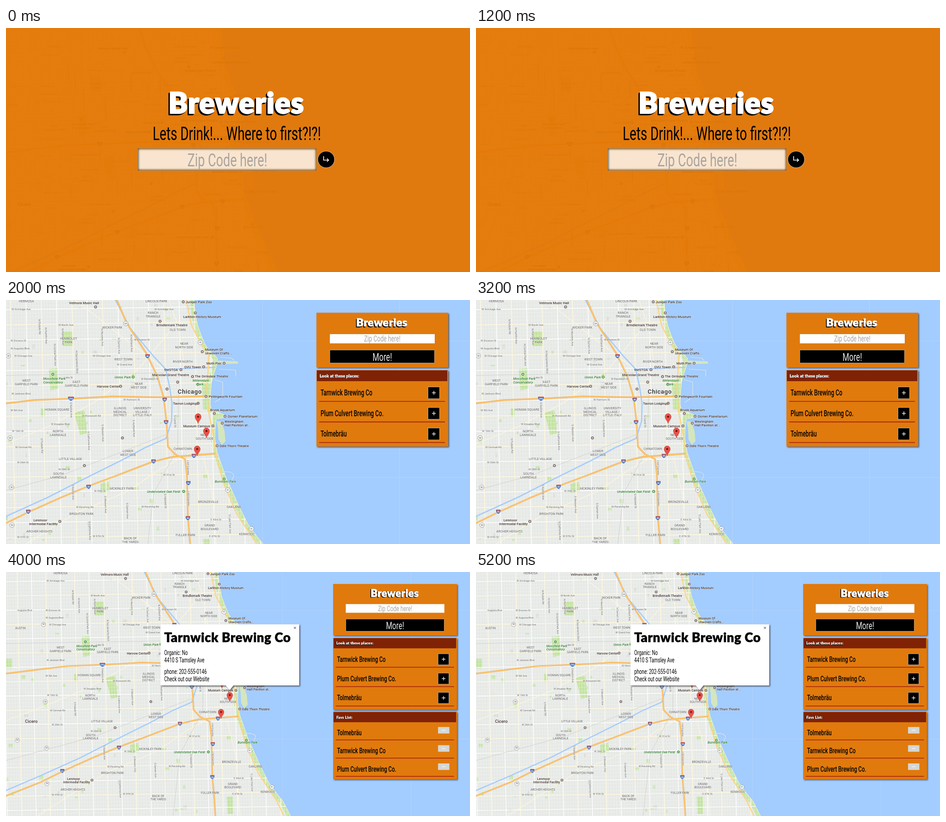
An HTML page that plays this animation: 1000 by 529 pixels, repeating every 6000 ms.

```html
<!DOCTYPE html>
<html lang="en">
<head>
<meta charset="utf-8">
<title>Breweries</title>
<style>
html, body { margin: 0; width: 100%; height: 100%; overflow: hidden; background: #a3ccff; }
svg { display: block; width: 100vw; height: 100vh; }
text { font-family: Roboto, sans-serif; white-space: pre; }
.head { font-family: Lato, sans-serif; font-weight: 900; letter-spacing: .02em; stroke-linejoin: round; }
.map text { font-size: 7.4px; paint-order: stroke; stroke: #fff; stroke-opacity: .55; stroke-width: 1.2px; stroke-linejoin: round; }
.map .area { font-size: 6.9px; fill: #5c5c5c; text-anchor: middle; }
.map .street { font-size: 5.8px; fill: #606060; }
.map .poi { fill: #40322f; font-weight: 500; }
.map .park { fill: #2f7d2f; font-weight: 500; }
.map .city { font-size: 13px; fill: #2b2b2b; text-anchor: middle; letter-spacing: .6px; font-weight: 500; }
.map .shield { font-size: 5px; fill: #fff; stroke: none; text-anchor: middle; font-weight: 700; }
.map .route { font-size: 5px; fill: #444; stroke: none; text-anchor: middle; }
</style>
</head>
<body>
<svg id="stage" viewBox="0 0 1000 529" preserveAspectRatio="none"></svg>
<script>
const ORANGE = '#e07a10', RED = '#7f2205';
const PLACES = ['Tarnwick Brewing Co', 'Plum Culvert Brewing Co.', 'Tolmebräu'];

let seed = 11;
const rnd = () => (seed = (seed * 16807) % 2147483647) / 2147483647;

const rect = (x, y, w, h, fill, more = '') =>
  `<rect x="${x}" y="${y}" width="${w}" height="${h}" fill="${fill}" ${more}/>`;
const line = (d, stroke, w, more = '') =>
  `<path d="${d}" fill="none" stroke="${stroke}" stroke-width="${w}" ${more}/>`;
const label = (x, y, s, cls, more = '') => `<text x="${x}" y="${y}" class="${cls}" ${more}>${s}</text>`;

// Narrow face: one fixed proportion for all interface text
const slim = (x, y, size, s, fill = '#000', anchor = 'start', weight = 400) =>
  `<text transform="translate(${x} ${y}) scale(.68 1)" font-size="${size}" fill="${fill}" text-anchor="${anchor}" font-weight="${weight}">${s}</text>`;

function head(x, y, size, s, anchor, drop) {
  const one = (dx, dy, c) => label(x + dx, y + dy, s, 'head',
    `font-size="${size}" fill="${c}" stroke="${c}" stroke-width="${size * .04}" text-anchor="${anchor}"`);
  return one(-drop, drop, '#000') + one(-drop / 2, drop / 2, '#000') + one(0, 0, '#fff');
}

// ---------- map ----------
const COAST = 'M397-60L405 0 408 30 413 55 420 75 427 92 436 108 449 119 456 127 453 144 447 163 443 178 441 200 440 226 442 236 452 241 466 247 473 251 466 256 453 258 451 275 450 300 455 330 462 350 469 370 475 388 482 402 490 420 501 445 511 465 521 485 532 501 546 519 555 530 580 580';
const LAND = COAST + 'H-100V-60z';

const ROADS = {
  river: 'M222-60L236 0 268 62 318 122 344 150 352 185 358 225 357 262 345 300 300 320 256 344 162 391 90 428 0 469-100 512M344 150L400 148 452 146',
  diagonal: 'M95-60L150 0 250 80 345 152M360 60L285 150 190 222 90 275 0 312-100 350M400 330L330 368 262 415 150 462 70 512-20 570M425 340L445 420 456 570M330-60L372 60 385 150',
  highway: 'M216-60L239 0 260 50 302 115 326 165 340 212 346 265 349 318 364 334 386 345 390 380 392 470 397 530 400 580M-100 237L0 224 60 217 140 214 230 209 330 211 430 209M-100 524L0 484 48 460 119 428 179 403 240 380 318 350 360 340 452 333',
  shore: 'M375-60L388 0 400 55 418 90 437 118 436 145 433 190 436 238 446 290 453 338 468 395 498 465 538 525 560 570'
};

function grid(from, to, step, along) {
  let d = '';
  for (let v = from; v < to; v += step)
    d += along ? `M-100 ${v + 1.5}L600 ${v - 9}` : `M${v - 1.2} -60L${v + 11.6} 580`;
  return d;
}

function streets() {
  const mile = 66;
  return line(grid(-78, 600, mile / 8, true) + grid(-122, 600, mile / 16 * 1.5, false), '#f6f7f5', .7, 'opacity=".65"')
    + line(grid(-78, 600, mile / 2, true) + grid(-122, 600, mile / 2, false), '#fff', 1.5)
    + line(grid(-78, 600, mile, true) + grid(-122, 600, mile, false), '#fcf5da', 1.6);
}

function blocks() {
  let s = '';
  for (let i = 0; i < 85; i++) {
    const x = rnd() * 520 - 90, y = rnd() * 620 - 50;
    s += rect(x.toFixed(1), y.toFixed(1), (3 + rnd() * 7).toFixed(1), (3 + rnd() * 7).toFixed(1),
      rnd() < .45 ? '#c8e5a9' : rnd() < .6 ? '#dcddd9' : '#ebe5d9');
  }
  const park = 'M122 68h22v32h-22zM92 150l20-2 2 44-18 4zM147 243l22-4 6 50-15 4zM204 398l18-4 2 21-20 3zM422 172h20l-2 66h-15zM-85 200h18v22h-18zM425 518h14v40h-12zM75 235h8v18h-8zM270 160h9v9h-9z';
  return s + `<path d="${park}" fill="#c3e3a0"/>`;
}

const AREAS = [
  [44, 5, 'HERMOSA'], [324, 5, 'LINCOLN PARK'], [317, 30, 'RANCH|TRIANGLE'], [229, 62, 'WICKER PARK'],
  [370, 67, 'OLD TOWN'], [135, 86, 'HUMBOLDT|PARK'], [384, 97, 'NEAR|NORTH SIDE'], [253, 131, 'WEST TOWN'],
  [381, 136, 'RIVER NORTH'], [286, 184, 'NEAR|WEST SIDE'], [44, 177, 'WEST|GARFIELD PARK'],
  [152, 180, 'EAST|GARFIELD PARK'], [110, 240, 'HOMAN SQUARE'], [246, 237, 'ILLINOIS|MEDICAL|DISTRICT'],
  [294, 237, 'UNIVERSITY|VILLAGE /|LITTLE ITALY'], [112, 287, 'NORTH|LAWNDALE'], [263, 330, 'LOWER|WEST SIDE'],
  [139, 347, 'LITTLE VILLAGE'], [113, 379, 'SOUTH|LAWNDALE'], [381, 325, 'CHINATOWN'], [428, 295, 'NEAR|SOUTH SIDE'],
  [250, 411, 'MCKINLEY PARK'], [436, 440, 'BRONZEVILLE'], [491, 451, 'OAKLAND'], [163, 466, 'BRIGHTON PARK'],
  [439, 491, 'GRAND|BOULEVARD'], [72, 504, 'ARCHER HEIGHTS'], [268, 519, 'BACK OF|THE YARDS'], [387, 512, 'FULLER PARK'],
  [519, 510, 'KENWOOD'], [-48, 132, 'AUSTIN']
];

// icon x, icon y, text x, text y, name
const POIS = [
  [193, 15, 136, 9, 'Velmora Music Hall'], [382, 4, 387, 7, 'Juniper Park Zoo'],
  [408, 28, 382, 39, 'Larkton History Museum'], [332, 46, 324, 57, 'Brindlemark Theatre'],
  [423, 112, 429, 110, 'Museum Of|Unwoven Crafts...'], [470, 137, 432, 140, 'Moth Pier'],
  [426, 145, 384, 148, 'QVU Tower'], [377, 151, 341, 154, 'theSTOA'], [370, 178, 315, 165, 'Marvolan Grand Theatre'],
  [402, 166, 407, 168, 'The Orrindale Theatre'], [247, 187, 196, 190, 'Harvow Center'],
  [431, 209, 437, 212, 'Pellingworth Fountain'], [414, 224, 360, 227, 'Tavron Lodgings'],
  [449, 246, 440, 241, 'Brusk Aquarium'], [472, 252, 478, 255, 'Osmer Planetarium'],
  [446, 273, 382, 276, 'Museum Campus'], [466, 267, 471, 266, 'Wexlingham|Hall Pavilion at...'],
  [455, 316, 460, 319, 'Odle Thorn Theatre'], [116, 480, 50, 480, '     Lenmoor|Intermodal Facility'],
  [169, 359, 0, 0, ''], [251, 299, 0, 0, ''], [347, 193, 0, 0, '']
];

const GREENS = [
  [383, 415, 304, 418, 'Understated Oak Field'], [101, 161, 80, 173, 'Mossfield Park|Conservatory'],
  [274, 167, 234, 170, 'Union Park'], [413, 183, 402, 177, 'Millennium|     Park'], [470, 388, 450, 396, 'Burnham Park']
];

const STREETS = [
  [12, 22, 'W Armitage Ave'], [320, 22, 'W Armitage Ave'], [113, 56, 'W North Ave'], [10, 90, 'W Division St'],
  [276, 88, 'W Division St'], [10, 107, 'W Augusta Blvd'], [18, 123, 'W Chicago Ave'], [187, 123, 'W Chicago Ave'],
  [239, 142, 'W Grand Ave'], [125, 170, 'Lake St'], [291, 173, 'W Randolph St'], [12, 205, 'W Jackson Blvd'],
  [253, 218, 'W Harrison St'], [10, 241, 'W 5th Ave'], [164, 253, 'W Roosevelt Rd'], [97, 271, 'W Douglas Blvd'],
  [13, 286, 'W 16th St'], [20, 321, 'W Cermak Rd'], [24, 354, 'W 26th St'], [113, 369, 'W 28th St'],
  [339, 381, 'W 31st St'], [190, 416, 'W 35th St'], [151, 451, 'W Pershing Rd'], [292, 450, 'W Pershing Rd'],
  [441, 478, 'E 43rd St'], [24, 516, 'W 47th St'], [187, 514, 'W 47th St'], [438, 514, 'E 47th St'], [-55, 90, 'Augusta Blvd']
];

const AVENUES = [
  [70, 42, 'N Pulaski Rd'], [84, 60, 'N Hamlin Ave'], [103, 95, 'N Central Park Ave'], [120, 62, 'N Homan Ave'],
  [150, 110, 'N Sacramento Blvd'], [205, 62, 'N Western Ave'], [241, 82, 'N Damen Ave'], [268, 75, 'N Ashland Ave'],
  [138, 222, 'S Kedzie Ave'], [176, 285, 'S California Ave'], [75, 300, 'S Pulaski Rd'], [206, 270, 'S Western Ave'],
  [273, 260, 'S Ashland Ave'], [362, 250, 'S Canal St'], [142, 400, 'S Kedzie Ave'], [212, 425, 'S Western Ave'],
  [259, 440, 'S Damen Ave'], [341, 420, 'S Halsted St'], [390, 348, 'I-94 Express'], [391, 415, 'I-90 Express'],
  [178, 480, 'S California Ave'], [480, 465, 'S Lake Park Ave']
];

const lines = (x, y, s, cls, more) => s.split('|').map((t, i) => label(x, y + i * 7.6, t, cls, more)).join('');
const dot = (x, y, c) => `<circle cx="${x}" cy="${y}" r="3.5" fill="${c}" stroke="#fff" stroke-width=".6"/><circle cx="${x}" cy="${y}" r="1.2" fill="#fff"/>`;

function spots(list, cls, color, more) {
  return list.map(([ix, iy, x, y, s]) => dot(ix, iy, color) + lines(x, y, s, cls, more)).join('');
}

function shields() {
  const inter = [[140, 214, 290], [305, 122, 90], [342, 216, 90], [345, 265, 90], [178, 405, 55],
    [318, 350, 55], [48, 459, 55], [405, 338, 55], [393, 397, 94], [392, 473, 90]];
  const round = [[419, 92, 41], [478, 412, 41], [529, 496, 41], [258, 51, 64], [5, 121, 50],
    [9, 299, 50], [12, 406, 50], [13, 488, 50], [-55, 388, 50]];
  return inter.map(([x, y, n]) => {
    const w = n > 99 ? 6.5 : 5;
    return `<path d="M${x - w} ${y - 4.5}h${2 * w}q1 7-${w} 9.5q-${w + 1}-2.5-${w}-9.5z" fill="#3f68b5" stroke="#fff" stroke-width=".6"/>`
      + rect(x - w + .3, y - 4.3, 2 * w - .6, 1.8, '#c8473f') + label(x, y + 2.2, n, 'shield');
  }).join('') + round.map(([x, y, n]) =>
    `<circle cx="${x}" cy="${y}" r="5" fill="#fff" stroke="#777" stroke-width=".7"/>` + label(x, y + 1.8, n, 'route')).join('');
}

function map() {
  return rect(-110, -70, 1250, 700, '#a3ccff')
    + line('M553-60V600M848-60V600M-100 88.5H1130M-100 385H1130', '#b4d5fc', 1)
    + `<path d="${LAND}" fill="#e6e9e6"/><g clip-path="url(#land)">` + blocks()
    + line(COAST, '#c6e5a4', 17) + streets()
    + line(ROADS.diagonal, '#fcf5da', 1.6)
    + line('M-100 165L200 160 340 158M300 580L318 420 370 320 372 200M-100 440L120 380 350 290', '#cfd1cf', 1)
    + line(ROADS.river, '#a3ccff', 2.6)
    + line(ROADS.shore, '#f5c375', 2.4) + line(ROADS.shore, '#fde08d', 1.4)
    + line(ROADS.highway, '#f2a850', 3.4) + line(ROADS.highway, '#fcc872', 2.2)
    + '</g>' + line(COAST, '#efeccf', 1.2) + line('M470 372q21 0 21 9l-4 9', '#dfe6df', 1.2)
    + '<path d="M450 131L500 133v5L450 139zM454 262l10 2 7 20 2 22-8 8-7-12-1-22z" fill="#d5e6bd"/>'
    + line('M462 124l24 2 6 5M459 150l36 2v14M449 173l18 5v30M450 222l12-8', '#dfe6df', 1.2)
    + STREETS.map(([x, y, s]) => label(x, y, s, 'street')).join('')
    + AVENUES.map(([x, y, s]) => label(0, 0, s, 'street', `transform="translate(${x} ${y}) rotate(88)"`)).join('')
    + AREAS.map(([x, y, s]) => lines(x, y, s, 'area')).join('')
    + shields() + spots(GREENS, 'park', '#4c9a4a', 'font-style="italic"') + spots(POIS, 'poi', '#7d6c67')
    + label(396, 203, 'Chicago', 'city') + label(-23, 348, 'Cicero', 'poi', 'style="font-size:10px" text-anchor="middle"');
}

const pin = (x, y) => `<g transform="translate(${x} ${y})"><path d="M0 0C-1-6-6.5-9-6.5-15.2A6.5 6.5 0 0 1 6.5-15.2C6.5-9 1-6 0 0z" fill="#ea5148" stroke="#b5332c" stroke-width=".7"/><circle cy="-15" r="2.3" fill="#6f1713"/></g>`;

// ---------- panels ----------
const box = (y, h) => rect(669, y, 284, h, ORANGE, 'filter="url(#drop)"');
const bar = (y, s) => rect(670, y, 281, 23.5, RED) + head(676, y + 15, 8.7, s, 'start', .6);
const rule = y => line(`M675 ${y}H946`, '#a51d0b', 1.6);

function search() {
  return box(27.6, 118.6) + head(810, 57, 23.4, 'Breweries', 'middle', 1.6)
    + rect(698, 74, 226, 20, '#fff') + slim(811, 90.3, 18, 'Zip Code here!', '#a5a5a5', 'middle')
    + rect(698, 108.5, 225.5, 28, '#000', 'stroke="#d9c0a0" stroke-width=".7"')
    + slim(811, 131.5, 24, 'More!', '#e8e8e8', 'middle');
}

function results() {
  return box(152, 165.6) + bar(152.5, 'Look at these places:') + PLACES.map((s, i) => {
    const y = 207.5 + i * 44.6;
    return slim(678, y - .5, 17.5, s, '#000', 'start', 500) + rule(y + 12.3)
      + rect(909.5, y - 19, 25, 25.5, '#000', 'stroke="#cfc4b0" stroke-width=".8"')
      + line(`M918 ${y - 6.3}h8.4M922.2 ${y - 10.5}v8.4`, '#fff', 1.3);
  }).join('');
}

function favs() {
  return box(322, 156) + bar(323, 'Favs List:') + [2, 0, 1].map((n, i) => {
    const y = 376.5 + i * 42;
    return slim(678, y, 17.5, PLACES[n], '#000', 'start', 500) + rule(y + 10.8)
      + rect(909.5, y - 19, 26, 15, '#d6d6d2') + line(`M918 ${y - 11.5}h8.5`, '#fff', 1.3);
  }).join('');
}

function popup() {
  const rows = [[179.5, 'Organic: No'], [196, '4410 S Tamsley Ave'], [220.5, 'phone: 202-555-0146'], [237, 'Check out our Website']];
  return '<path d="M333 113.5H632V246H490L482 256 474 246H333z" fill="#fff" filter="url(#drop)"/>'
    + label(341, 151.5, PLACES[0], 'head', 'font-size="27.5" fill="#000" stroke="#000" stroke-width=".5"')
    + rows.map(([y, s]) => slim(341, y, 14.3, s, '#000')).join('')
    + line('M620.5 119l4.4 4.4m0-4.4l-4.4 4.4', '#777', 1.2);
}

function cover() {
  return rect(0, 0, 1000, 529, 'rgb(228,117,1)', 'opacity=".94"')
    + head(496.5, 185, 62, 'Breweries', 'middle', 3)
    + slim(497.5, 243, 40.5, 'Lets Drink!... Where to first?!?!', '#000', 'middle')
    + '<g clip-path="url(#field)">' + rect(284, 261, 385, 48, '#fff', 'opacity=".8"')
    + rect(283, 260, 387, 50, 'none', 'stroke="#4f4a38" stroke-width="5" filter="url(#soft)"') + '</g>'
    + slim(477, 300, 39.5, 'Zip Code here!', '#a9a5a0', 'middle')
    + '<circle cx="690" cy="285" r="18" fill="#000" stroke="#f3d9bb" stroke-width=".8"/>'
    + line('M684.5 278V286.5H695M691.7 283L695.2 286.5 691.7 290', '#fff', 1.6);
}

const stage = document.getElementById('stage');
stage.innerHTML = `<defs>
  <clipPath id="land"><path d="${LAND}"/></clipPath>
  <clipPath id="field"><rect x="284" y="261" width="385" height="48"/></clipPath>
  <filter id="drop" x="-5%" y="-8%" width="112%" height="120%"><feDropShadow dx="2" dy="2" stdDeviation="1.8" flood-color="#333" flood-opacity=".75"/></filter>
  <filter id="soft" x="-5%" y="-20%" width="110%" height="140%"><feGaussianBlur stdDeviation="2"/></filter>
</defs>
<g id="world"><g class="map">${map()}</g>
  <g id="panel">${pin(414, 268)}${pin(432, 299)}${pin(412, 338)}${search()}${results()}</g>
  <g id="favs">${favs()}</g></g>
<g id="popup">${popup()}</g>
<g id="cover">${cover()}</g>`;

// ---------- playback ----------
const VIEWS = ['translate(62 38)', '', 'translate(76.2 0) scale(.94)'];
const part = id => document.getElementById(id);
const show = (id, on) => part(id).setAttribute('display', on ? 'inline' : 'none');

function render(t) {
  const scene = Math.floor(t % 6000 / 2000);
  part('world').setAttribute('transform', VIEWS[scene]);
  show('cover', scene === 0);
  show('panel', scene > 0);
  show('favs', scene === 2);
  show('popup', scene === 2);
}

const start = performance.now();
function tick() {
  render(performance.now() - start);
  requestAnimationFrame(tick);
}
tick();
</script>
</body>
</html>
```
